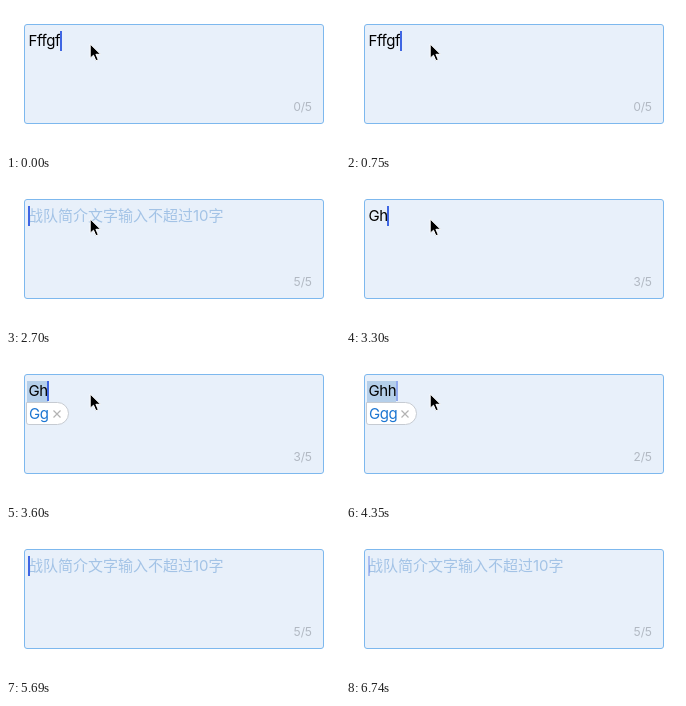
Write an HTML page that moves like this. It is 334 px wide and 147 px high and loops after 6.87 s.

```html
<!DOCTYPE html>
<html lang="zh">
<head>
<meta charset="utf-8">
<title>Text field with counter</title>
<style>
  html, body { margin: 0; width: 100%; height: 100%; overflow: hidden; background: #fff; }
  body { position: relative; font: 15px/20px Inter, "Noto Sans CJK SC", "Noto Sans CJK", sans-serif; }
  body > * { position: absolute; white-space: nowrap; }
  #field {
    left: 18px; top: 18px; width: 300px; height: 100px; box-sizing: border-box;
    background: #e8f0fa; border: 1px solid #7db8ee; border-radius: 3px;
  }
  #hint { left: 22px; top: 25px; color: #a3c3e6; }
  #mark { left: 21px; top: 25px; height: 21px; background: #b5cfea; }
  #text { left: 22.5px; top: 25px; color: #000; letter-spacing: -.4px; }
  #caret { top: 25px; width: 2px; height: 20px; background: #3f66e3; }
  #count {
    right: 28px; top: 91px; color: #b1b8c2; font-size: 12px;
    letter-spacing: -.4px; font-variant-numeric: tabular-nums;
  }
  #pop {
    left: 20px; top: 46px; height: 23px; box-sizing: border-box; padding: 0 7px 0 2px;
    display: flex; align-items: center; background: #fff; color: #1c76d2;
    border: 1px solid #c6cbd2; border-radius: 0 12px 12px 3px; letter-spacing: -.4px;
  }
  #pop svg { width: 8px; height: 8px; margin-left: 4px; stroke: #b3b3b3; stroke-width: 1.2; }
  #mouse { left: 0; top: 0; width: 13px; height: 19px; overflow: visible; }
</style>
</head>
<body>
<div id="field"></div>
<div id="mark"></div>
<div id="hint">战队简介文字输入不超过10字</div>
<div id="text"></div>
<div id="caret"></div>
<div id="count"></div>
<div id="pop"><span id="word"></span><svg viewBox="0 0 8 8"><path d="M.5 .5 7.5 7.5M7.5 .5 .5 7.5"/></svg></div>
<svg id="mouse" viewBox="0 0 13 19">
  <path d="M1.2 1V15.2L4.5 12.2 6.9 17.7 9.3 16.7 6.9 11.3H11.6Z" fill="#000" stroke="#fff" stroke-width="1"/>
</svg>
<script>
const LOOP = 6870, LIMIT = 5;

// [start, value] steps, each held until the next one
const typed = [[0, "Fffgf"], [900, "Fffg"], [1200, "Fff"], [1650, "Ff"], [2100, "F"], [2700, ""],
  [3300, "Gh"], [3750, "Ghh"], [4500, "Gh"], [4950, "G"], [5690, ""]];
const offered = [[0, ""], [3600, "Gg"], [3750, "Ggg"], [4500, ""]];
const blink = [[0, 1], [150, .5], [300, 0], [600, .4], [750, 1], [4350, .5], [4500, 1],
  [5550, .5], [5690, 1], [6290, .5], [6440, 0], [6740, .35]];
const pointer = [[0, [83, 37]], [4650, [86, 38]], [4800, [95, 52]], [5400, null]];

const el = id => document.getElementById(id);
const [hint, mark, text, caret, count, pop, word, mouse] =
  ["hint", "mark", "text", "caret", "count", "pop", "word", "mouse"].map(el);
const at = (steps, t) => steps.findLast(([start]) => start <= t)[1];
const show = (node, on) => { node.style.visibility = on ? "visible" : "hidden"; };

function draw(t) {
  const value = at(typed, t), guess = at(offered, t), spot = at(pointer, t);
  text.textContent = value;
  count.textContent = `${LIMIT - value.length}/${LIMIT}`;
  word.textContent = guess;
  const width = text.getBoundingClientRect().width;
  caret.style.left = 22 + width + "px";
  caret.style.opacity = at(blink, t);
  mark.style.width = width + 1.5 + "px";
  show(hint, !value);
  show(mark, guess);
  show(pop, guess);
  show(mouse, spot);
  if (spot) mouse.style.transform = `translate(${spot[0]}px, ${spot[1]}px)`;
}

const origin = performance.now();
function tick() {
  draw((performance.now() - origin) % LOOP);
  requestAnimationFrame(tick);
}
tick();
</script>
</body>
</html>
```
